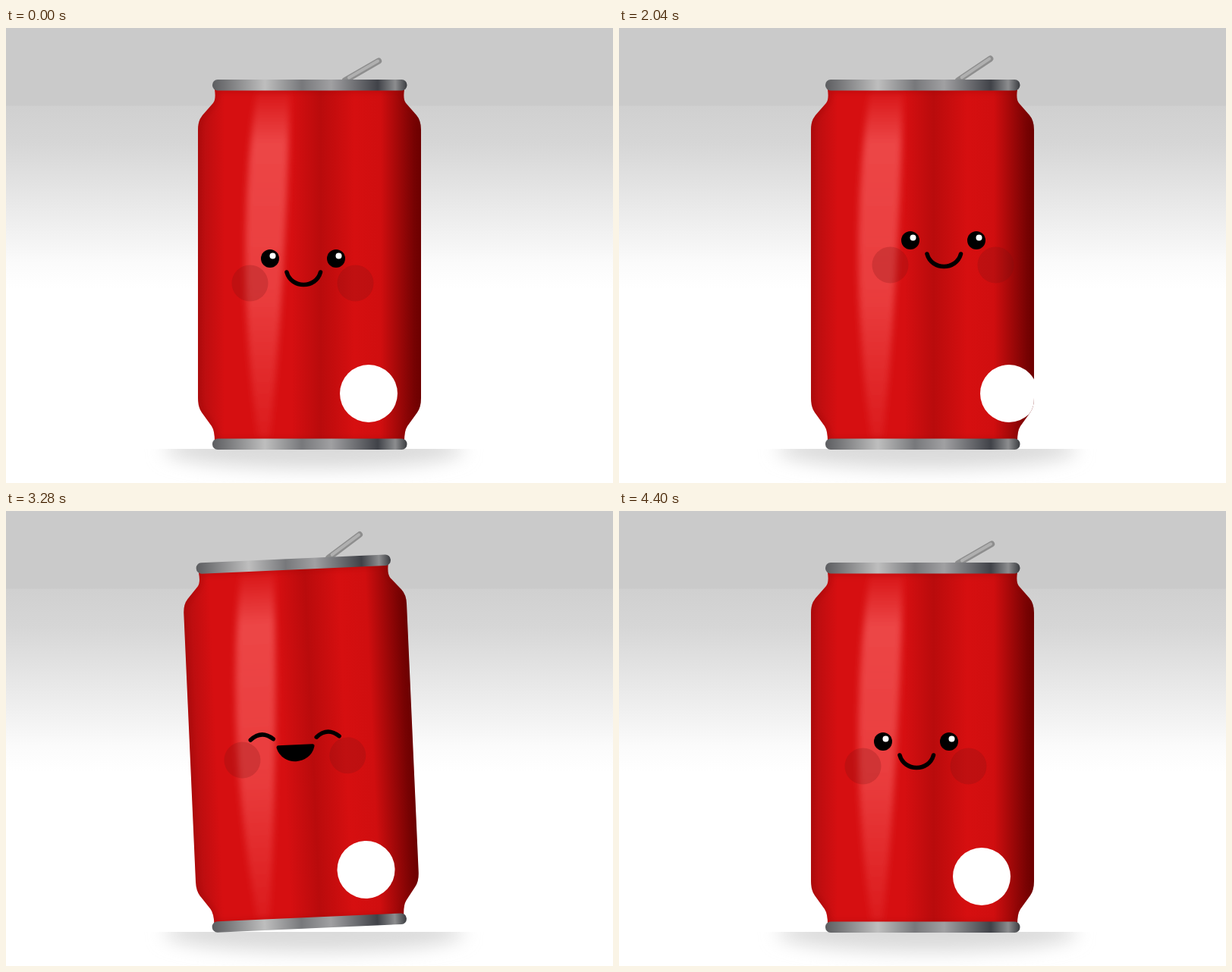
These frames come from a looping animation (800x600 px, 4880 ms). An HTML page:

```html
<!DOCTYPE html>
<html lang="en">
<head>
<meta charset="utf-8">
<title>Happy can</title>
<style>
  html, body { margin: 0; width: 100%; height: 100%; overflow: hidden; background: #fff; }
  svg { display: block; width: 100%; height: 100%; }
</style>
</head>
<body>
<svg viewBox="0 0 800 600" xmlns="http://www.w3.org/2000/svg">
  <defs>
    <linearGradient id="wall" gradientUnits="userSpaceOnUse" x1="0" y1="0" x2="0" y2="345">
      <stop offset=".295" stop-color="#cacaca"/><stop offset=".3" stop-color="#d0d0d0"/>
      <stop offset=".44" stop-color="#d6d6d6"/><stop offset=".9" stop-color="#fbfbfb"/>
      <stop offset="1" stop-color="#fff"/>
    </linearGradient>
    <linearGradient id="red">
      <stop offset="0" stop-color="#b40d0f"/><stop offset=".12" stop-color="#d60f11"/>
      <stop offset=".42" stop-color="#d60f11"/><stop offset=".55" stop-color="#b90b0c"/>
      <stop offset=".7" stop-color="#d60f10"/><stop offset=".82" stop-color="#d00e0f"/>
      <stop offset="1" stop-color="#640000"/>
    </linearGradient>
    <linearGradient id="shine" x1="0" y1="0" x2="0" y2="1">
      <stop offset="0" stop-color="#f25454" stop-opacity=".1"/>
      <stop offset=".15" stop-color="#f25454" stop-opacity=".8"/>
      <stop offset=".6" stop-color="#f25050" stop-opacity=".7"/>
      <stop offset="1" stop-color="#f04a4a" stop-opacity=".2"/>
    </linearGradient>
    <linearGradient id="metal">
      <stop offset="0" stop-color="#5c5d60"/><stop offset=".27" stop-color="#bebebe"/>
      <stop offset=".46" stop-color="#77787b"/><stop offset=".61" stop-color="#a0a0a2"/>
      <stop offset=".85" stop-color="#404248"/><stop offset=".94" stop-color="#8c8d8f"/>
      <stop offset="1" stop-color="#3a3c40"/>
    </linearGradient>
    <filter id="soft" x="-30%" y="-30%" width="160%" height="160%"><feGaussianBlur stdDeviation="4"/></filter>
    <filter id="haze" x="-30%" y="-80%" width="160%" height="260%"><feGaussianBlur stdDeviation="12"/></filter>
    <clipPath id="floor"><rect y="555" width="800" height="45"/></clipPath>
    <path id="shape" d="M275 81Q277 94 273 99L259 115Q253 122 253 134V488Q253 500 258 507L271 525Q275 531 275 545H525Q525 531 529 525L542 507Q547 500 547 488V134Q547 122 541 115L527 99Q523 94 525 81Z"/>
    <clipPath id="body"><use href="#shape"/></clipPath>
    <rect id="rim" x="272" width="256.5" height="14.5" rx="7" fill="url(#metal)"/>
    <g id="ball">
      <circle cy="-12" r="12"/>
      <circle cx="3.5" cy="-15.5" r="4" fill="#fff"/>
    </g>
  </defs>

  <rect width="800" height="600" fill="url(#wall)"/>
  <g clip-path="url(#floor)">
    <ellipse cx="406" cy="556" rx="198" ry="25" fill="#dadada" filter="url(#haze)"/>
  </g>

  <g id="can">
    <g id="tab" stroke-linecap="round">
      <path d="M0 0H51" stroke="#8e8e8e" stroke-width="8"/>
      <path d="M6 -.5H50" stroke="#b0b0b0" stroke-width="4"/>
    </g>
    <use href="#shape" fill="url(#red)"/>
    <g clip-path="url(#body)">
      <path d="M330 84Q300 300 332 540H348Q370 320 374 84Z" fill="url(#shine)" filter="url(#soft)"/>
      <use href="#shape" fill="none" stroke="#8c0505" stroke-width="5" stroke-opacity=".45" filter="url(#soft)"/>
      <circle id="spot" cy="482" r="38" fill="#fff"/>
      <g id="face">
        <g fill="#741212" fill-opacity=".22">
          <circle cx="321.5" cy="336.5" r="24"/>
          <circle cx="460.5" cy="336.5" r="24"/>
        </g>
        <g id="open"><use href="#ball"/><use href="#ball" x="87"/></g>
        <g fill="none" stroke="#000" stroke-width="5.5" stroke-linecap="round" stroke-linejoin="round">
          <path id="arcs"/>
          <path id="mouth" fill="#000"/>
        </g>
      </g>
    </g>
    <use href="#rim" y="68"/>
    <use href="#rim" y="541.5"/>
  </g>
</svg>
<script>
const LOOP = 4880, STEP = 40;
const { PI, sin, cos, max, min, abs } = Math;
const $ = id => document.getElementById(id);
const set = (id, name, value) => $(id).setAttribute(name, value);

const part = (t, from, to) => min(1, max(0, (t - from) / (to - from)));
const ease = (t, from, to) => (1 - cos(PI * part(t, from, to))) / 2;
const blink = (t, mid) => ease(120 - abs(t - mid), 0, 120);

function draw(t) {
  // Look left, look right, then back to the middle.
  const left = ease(t, 1050, 1520);
  const right = ease(t, 1520, 2100);
  const back = ease(t, 2500, 2940);
  const turn = 38 * (2 * right - left - back);
  const lift = 18 * back + 6 * ease(t, 4040, 4360) - 24 * left;

  const laugh = ease(t, 2600, 2840) - ease(t, 4060, 4300);
  const squint = ease(t, 2680, 2860) - ease(t, 4120, 4280);
  const bend = ease(t, 2840, 2960) - ease(t, 4040, 4140);
  const shut = max(squint, blink(t, 340), blink(t, 600), blink(t, 2340));

  // Rocking dies away; the tab runs slightly ahead of it.
  const s = part(t, 2840, 4400);
  const fade = 1 - s * s;
  const phase = s * 1560 / 326 * PI;
  const rock = 3.1 * fade * sin(phase);
  const shake = fade * ease(t, 2780, 2960);
  const flick = part(t, 240, 800);
  const tab = 30 + 12 * (1 - flick) * sin(3 * PI * flick)
    + 4 * (right - ease(t, 2240, 2520))
    - shake * (9.7 + 14.7 * sin(phase + .28));

  // The can tips over whichever bottom corner it leans on.
  set('can', 'transform', `rotate(${rock} ${rock > 0 ? 528 : 272} 556)`);
  set('tab', 'transform', `translate(447 69) rotate(${-tab})`);
  set('spot', 'cx', 478 + turn);
  set('face', 'transform', `translate(${turn} ${lift})`);

  const happy = squint === 1;
  set('open', 'visibility', happy ? 'hidden' : 'visible');
  set('arcs', 'visibility', happy ? 'visible' : 'hidden');
  set('open', 'transform', `translate(348 316) scale(1 ${1 - .9 * shut})`);
  const arc = x => `M${x - 15} 310.5q15 ${-13 * bend} 30 0`;
  set('arcs', 'd', arc(348.5) + arc(435.5));

  const lip = 344 - 22 * laugh;
  set('mouth', 'd', `M370 322C376 344 408.5 344 414.5 322C408.5 ${lip} 376 ${lip} 370 322Z`);
}

function frame(now) {
  draw(Math.floor(now % LOOP / STEP) * STEP);
  requestAnimationFrame(frame);
}
draw(0);
requestAnimationFrame(frame);
</script>
</body>
</html>
```
